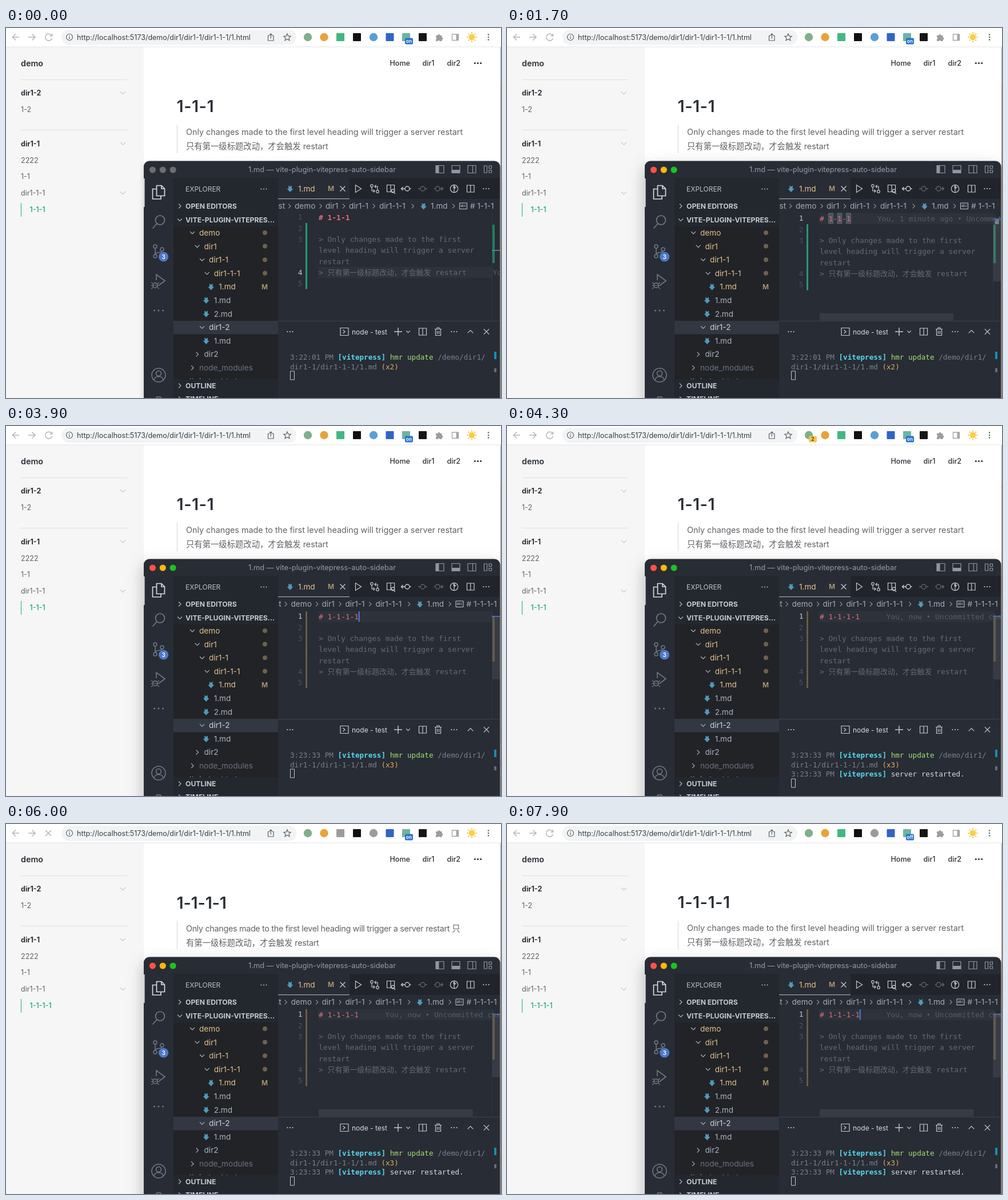
These frames come from a looping animation (866 px wide and 647 px high, 8000 ms). An HTML page:

```html
<!DOCTYPE html>
<html lang="zh-CN">
<head>
<meta charset="utf-8">
<style>
html, body { margin: 0; width: 100%; height: 100%; overflow: hidden; background: #fff; }
svg { display: block; }
text { font-family: Inter, 'Noto Sans CJK SC', 'Noto Sans CJK', sans-serif; white-space: pre; }
.mono { font-family: 'DejaVu Sans Mono', 'Noto Sans CJK SC', 'Noto Sans CJK', monospace; }
path { fill: none; }
</style>
</head>
<body>
<script>
const LOOP = 8000, END = '-8000';

// Drawing helpers; text is placed by the middle of its capitals.
const text = (x, y, s, size, fill, more = '') =>
  `<text x="${x}" y="${y + size * .36}" font-size="${size}" fill="${fill}" ${more}>${s}</text>`;
const mono = (x, y, s, size, fill, more = '') => text(x, y, s, size, fill, 'class="mono" ' + more);
const rect = (x, y, w, h, fill, more = '') =>
  `<rect x="${x}" y="${y}" width="${w}" height="${h}" fill="${fill}" ${more}/>`;
const disc = (x, y, r, fill, more = '') => `<circle cx="${x}" cy="${y}" r="${r}" fill="${fill}" ${more}/>`;
const ring = (x, y, r, col, w = 1.2) => disc(x, y, r, 'none', `stroke="${col}" stroke-width="${w}"`);
const line = (d, col, w = 1.2, more = '') => `<path d="${d}" stroke="${col}" stroke-width="${w}" ${more}/>`;
const box = (x, y, w, h) => `M${x} ${y}h${w}v${h}h${-w}z`;
const at = (x, y, body) => `<g transform="translate(${x} ${y})">${body}</g>`;
const dots = (x, y, col, gap = 4.6, r = 1.1) => [-1, 0, 1].map(i => disc(x + i * gap, y, r, col)).join('');
const chevron = (x, y, turn, col, s = 4, w = 1.2) =>
  line(`M${-s / 2} ${-s}L${s / 2} 0L${-s / 2} ${s}`, col, w, `transform="translate(${x} ${y}) rotate(${turn})"`);
const cross = (x, y, s, col, w = 1.3) =>
  line(`M${x - s} ${y - s}l${2 * s} ${2 * s}m0 ${-2 * s}l${-2 * s} ${2 * s}`, col, w);
const down = (x, y) =>
  at(x, y, '<path d="M-2.8-5.5L0-3.5L2.8-5.5V0H5.5L0 6L-5.5 0H-2.8Z" style="fill:#519aba"/>');
const badge = (x, y, s) =>
  disc(x, y, 8.6, '#4d78cc') + text(x, y, s, 10, '#fff', 'text-anchor="middle" font-weight="600"');
// Shows its body only in the given spans of the loop.
const on = (spans, body) => `<g data-on="${spans}">${body}</g>`;

const BOLD = 'font-weight="700"', SEMI = 'font-weight="600"', MED = 'font-weight="500"', MID = 'text-anchor="middle"';

function toolbar() {
  const dim = '#b4b6b9', grey = '#5f6368', tag = (x, s, fill, col) =>
    rect(x - 7, 17.5, 14, 11, fill, 'rx="2"') + text(x, 23, s, 8.5, col, MID + ' ' + SEMI);
  const square = (x, fill) => rect(x - 7, 9, 14, 14, fill, 'rx="1"');
  return rect(0, 0, 866, 33, '#fff') + rect(0, 32.5, 866, 1, '#e3e4e6') +
    rect(97, 3, 411, 26.5, '#f1f3f4', 'rx="13.2"') +
    line('M23 16H11.5M17 10.5L11.5 16L17 21.5M39 16H51M45.5 10.5L51 16L45.5 21.5', dim, 1.5) +
    on('0-5400 6800' + END, line('M79.5 12.5A6 6 0 1 0 80.5 18M80.5 10V14H76.5', dim, 1.5)) +
    on('5400-6800', cross(74, 16, 5, dim, 1.5)) +
    ring(111, 16, 5.5, grey) + line('M111 15.5v3.5M111 13v1.3', grey, 1.3) +
    text(124, 16.3, 'http://localhost:5173/demo/dir1/dir1-1/dir1-1-1/1.html', 12.5, '#3c4043') +
    line('M461 13.5h-2.5v8.5h9.5v-8.5h-2.5M463.3 18.5v-8.5m-2.5 2.5l2.5-2.5l2.5 2.5', grey) +
    line('M492 10l1.8 4.1l4.4 .4l-3.3 2.9l1 4.3l-3.9-2.3l-3.9 2.3l1-4.3l-3.3-2.9l4.4-.4z', grey) +
    disc(528, 16, 7.2, '#7fb08a') +
    on('4200-5400', tag(535, '2', '#f4c64f', '#333')) +
    disc(556.5, 16, 7.2, '#e7a33c') +
    on('0-5400 7500' + END, square(585, '#41b883')) + on('5400-7500', square(585, '#9b9b9b')) +
    square(614, '#111') +
    on('0-5400', disc(643, 16, 7.2, '#5a9fd6')) + on('5400' + END, disc(643, 16, 7.2, '#9b9b9b')) +
    square(671.5, '#2f65c7') + square(700, '#6cb5a2') +
    on('0-6600', tag(705, 'on', '#2b73c9', '#fff')) + on('6600' + END, tag(705, 'off', '#2b73c9', '#fff')) +
    square(729, '#161616') +
    '<path d="M752 13h3.5a2 2 0 1 1 4 0h3v3.5a2 2 0 1 1 0 4v2.5h-3.5a2 2 0 0 0-3.7 0H752v-3.5a2 2 0 0 0 0-3.7z" style="fill:#9a9da1"/>' +
    line(box(780.5, 11, 11, 10.5), '#a5a7aa', 1.4) + rect(787.5, 11, 4, 10.5, '#a5a7aa') +
    Array.from({ length: 8 }, (_, i) => line('M6.5 0h2', '#f2bd35', 2, `transform="translate(815 16) rotate(${i * 45})"`)).join('') +
    disc(815, 16, 5.4, '#f8cf45') +
    [-4.5, 0, 4.5].map(d => disc(844, 16 + d, 1.3, grey)).join('');
}

function page() {
  const ink = '#2b3036', soft = '#606266', green = '#1eaa7c';
  const item = (y, s, head) => text(26, y, s, 12.54, head ? ink : soft, head ? BOLD : '');
  const active = s => text(41.5, 317, s, 12.54, green, MED);
  const title = (s, gap) => text(298.5, 137, s, 28.7, ink, `${SEMI} letter-spacing="${gap}"`);
  const en = 'Only changes made to the first level heading will trigger a server restart';
  const quote = (y, s, more) => text(315, y, s, 14.34, soft, more);
  const tight = s => `<tspan letter-spacing="-.31">${s}</tspan>`;
  const full = quote(182, en) + quote(207, '只有第一级标题改动，才会触发 restart');
  return rect(0, 33, 241, 614, '#f6f6f7') +
    text(26, 61.5, 'demo', 14.34, ink, SEMI) +
    rect(26, 90, 186, 1, '#e0e0e2') + rect(26, 178, 186, 1, '#e0e0e2') +
    item(113.5, 'dir1-2', 1) + item(142.5, '1-2') + item(202, 'dir1-1', 1) +
    item(231, '2222') + item(259.5, '1-1') + item(288.5, 'dir1-1-1') +
    [113.5, 202, 288.5].map(y => chevron(204.5, y, 90, '#a9abae', 4.6, 1)).join('') +
    rect(26, 306, 1, 24, green) +
    text(671.5, 61.5, 'Home', 12.54, ink, MED) + text(728.5, 61.5, 'dir1', 12.54, ink, MED) +
    text(771.5, 61.5, 'dir2', 12.54, ink, MED) + dots(825.5, 61.5, ink, 5.2, 1.6) +
    rect(298.8, 169, 1.3, 50, '#dedee0') +
    on('0-6000', active('1-1-1') + title('1-1-1', .5) + full) +
    on('6000-6900', at(0, .5, active('1-1-1-1') + title('1-1-1-1', -.2) +
      quote(182, tight(en) + ' 只') + quote(207, '有第一级标题改动，才会触发 ' + tight('restart')))) +
    on('6900' + END, active('1-1-1-1') + title('1-1-1-1', .5) + full) +
    rect(865, 33, 1, 65, '#8fa6c4') + rect(865, 98, 1, 549, '#a58f78');
}

function frame() {
  const col = '#9197a1', lights = c => c.map((f, i) => disc(256.5 + i * 17.8, 248, 5.6, f)).join('');
  return `<rect id="shade" x="241" y="233" width="623" height="440" rx="10"/>` +
    rect(241, 232.5, 623.5, 440, '#282c34', 'rx="10"') +
    on('0-1100', lights(['#6c6e72', '#6c6e72', '#6c6e72'])) +
    on('1100' + END, lights(['#fe5148', '#fdb70c', '#1dc121'])) +
    on('2100-3700', disc(256.5, 248, 2, '#7a1410')) +
    text(553, 247.5, '1.md — vite-plugin-vitepress-auto-sidebar', 12.85, '#959ca8', MID) +
    [759, 787, 815].map(x => line(box(x - 7, 240.5, 14, 13), col)).join('') +
    rect(752, 240.5, 5.5, 13, col) + rect(780, 248, 14, 5.5, col) + line('M816.5 240.5v13', col) +
    line(box(836.5, 241, 5, 12) + box(845, 241, 4.5, 4.5) + box(845, 248.5, 4.5, 4.5), col);
}

function activity() {
  const dim = '#737984', lit = '#d7dae0';
  return rect(241, 263, 1.6, 50, lit) +
    at(267, 287, line('M-3.5-11.5H5L10.5-6V6.5H-3.5ZM5-11.5V-6H10.5M-3.5-5.5H-10.5V12H4V6.5', lit, 1.7)) +
    at(267, 339, ring(2.5, -3, 8, dim, 1.7) + line('M-3 3L-10.5 11.5', dim, 1.7)) +
    at(266, 390, ring(-5, -8, 3, dim, 1.5) + ring(-5, 9, 3, dim, 1.5) + ring(7, -3, 3, dim, 1.5) +
      line('M-5-5V6M7 0C7 4-5 1-5 6', dim, 1.5)) +
    badge(275.6, 400, 3) +
    at(266, 443, line('M-3-2V-12L12-1L2 6.5', dim, 1.6) + ring(-5, 7, 4.2, dim, 1.5) +
      line('M-9 7H-1M-12 2l3.5 2.5M2 2l-3.5 2.5M-12.5 7.5h3M2.5 7.5h-3M-12 13l3.5-2.5M2 13l-3.5-2.5', dim)) +
    dots(267, 494, dim, 7.5, 1.5) +
    ring(267, 607, 12, dim, 1.6) + ring(267, 604, 4.5, dim, 1.6) + line('M259 615.5c1-8 15-8 16 0', dim, 1.6) +
    line('M262.5 647l1.5-2h6l1.5 2', dim, 1.5) +
    on('2100-3700', badge(276, 296, 1));
}

function explorer() {
  const grey = '#abb2bf', gold = '#e2c08d', faint = '#6b717d', lit = '#d0d3d9', size = 13.6;
  const head = (y, s, turn) => chevron(304, y, turn, grey) + text(314, y, s, 12.2, '#c5c9d1', BOLD);
  // Rows: name, indent, kind (v open, > closed, f file), colour.
  const rows = [['demo', 0, 'v', gold], ['dir1', 1, 'v', gold], ['dir1-1', 2, 'v', gold], ['dir1-1-1', 3, 'v', gold],
    ['1.md', 4, 'f', gold], ['1.md', 3, 'f', grey], ['2.md', 3, 'f', grey], ['dir1-2', 2, 'v', lit],
    ['1.md', 3, 'f', grey], ['dir2', 1, '>', grey], ['node_modules', 0, '>', faint], ['index.html', 0, 'f', grey]];
  const row = ([name, depth, kind, col], i) => {
    const x = 338 + depth * 8.55, y = 358 + i * 23.62;
    return (kind == 'f' ? down(x - 13.5, y) : chevron(x - 12, y, kind == 'v' ? 90 : 0, grey)) +
      text(x, y, name, size, col) + (i < 4 ? disc(453, y, 4, '#6d614e') : '');
  };
  return rect(293, 262, 183, 385, '#23272e') + rect(293, 347, 183, 267, '#212327') +
    text(314, 281.5, 'EXPLORER', 12, '#bcc1ca') + dots(451, 281.5, grey) +
    on('0-2100 3700' + END, head(311.5, 'OPEN EDITORS', 0)) +
    on('2100-3700', head(311.5, 'OPEN EDITO...', 0) + text(443, 304, '1', 12, '#e6e8ec', MID + ' ' + MED) +
      text(443, 318, 'unsaved', 12, '#e6e8ec', MID + ' ' + MED)) +
    head(335.5, 'VITE-PLUGIN-VITEPRES...', 90) +
    rect(293, 512, 183, 23.5, '#323741') +
    `<g clip-path="url(#tree)">${rows.map(row).join('')}</g>` +
    text(447, 452.5, 'M', 12, '#b39a74', SEMI) +
    head(625.5, 'OUTLINE', 0) + head(648.5, 'TIMELINE', 0);
}

function tabs() {
  const lit = '#c5c9d1', dim = '#5d636e', gold = '#e2c08d', y = 281;
  const crumb = (x, s) => text(x, 311.5, s, 13.6, '#a4abb7');
  const crumbs = title => crumb(476.5, 'st') +
    crumb(505, 'demo') + crumb(559, 'dir1') + crumb(600, 'dir1-1') + crumb(653, 'dir1-1-1') +
    [496, 550.5, 591, 643.5, 711.5, 783].map(x => chevron(x, 311.5, 0, '#8b919c', 3.8)).join('') +
    down(730.5, 311.5) + crumb(743, '1.md') + line(box(793.5, 306, 13, 10.5), lit, 1) +
    text(800, 311, 'abc', 6, lit, MID) + crumb(812, title);
  return rect(476, 262, 388, 37, '#21252b') + rect(476, 262, 125, 37, '#282c34') + rect(476, 298, 125, 1.2, '#a2a7b0') +
    down(497, y) + text(511, y, '1.md', 13.6, gold) + text(563, y, 'M', 12, '#b39a74', SEMI) +
    on('0-2100 3700' + END, cross(589, y, 4.5, lit)) + on('2100-3700', disc(589, y, 4.6, '#e4e6ea')) +
    line('M611.5 274.5v13l10-6.5z', lit) +
    at(645, y, ring(-5, -5, 2.3, lit) + ring(5, 5, 2.3, lit) +
      line('M-5-2.5V4H0M-2.5 1.5L0 4L-2.5 6.5M5 2.5V-4H0M2.5-6.5L0-4L2.5-1.5', lit)) +
    line(box(666.5, 274.5, 13, 12) + 'M673 274.5v12M679 288l2 2', lit) + ring(677, 285, 2.8, lit) +
    ring(702, y, 4, lit, 1.4) + line('M706 281h2.5M698 281h-6m2.5-3l-3 3l3 3', lit, 1.4) +
    ring(729, y, 4, dim, 1.4) + line('M725 281h-4m12 0h4', dim, 1.4) +
    ring(755, y, 4, dim, 1.4) + line('M751 281h-2m10 0h5m-2.5-3l3 3l-3 3', dim, 1.4) +
    ring(784, y, 6.7, lit) + line('M784 275v12M784 281l3.5-2.5', lit) + disc(784, 278, 1.7, lit) +
    line(box(806.5, 275, 12.5, 12) + 'M812.7 275v12', lit) + dots(840, y, lit) +
    on('0-2800', crumbs('# 1-1-1')) + on('2800' + END, at(-6.5, 0, crumbs('# 1-1-1-1')));
}

function editor() {
  const X = 547, W = 7.78, S = 12.93, red = '#e06c75', note = '#646a76', thumb = '#363b45';
  const body = (cur, extra) => {
    const nums = [330.8, 350, 369.3, 427.5, 446.8].map((y, i) =>
      mono(518.5, y, i + 1, S, i + 1 == cur ? '#c0c5ce' : '#495162', 'text-anchor="end"')).join('');
    const words = [[369.3, '&gt; Only changes made to the first'], [388.8, 'level heading will trigger a server'],
      [408.1, 'restart'], [427.5, '&gt; 只有第一级标题改动，才会触发 restart']].map(([y, s]) => mono(X, y, s, S, note)).join('');
    return rect(546, cur == 1 ? 321.5 : 417.8, 304, 19.4, '#2d323b') + nums + words + extra;
  };
  const title = (s, more) => mono(X, 331, s, S, red, more);
  const blame = (x, y, s) => mono(x, y, s, S, '#565c67');
  const marks = [2, 4, 6].map(i =>
    rect(X + W * i, 322, W, 18, '#4a515e', 'stroke="#667080" stroke-width=".8"')).join('');
  const caret = x => rect(x, 322.5, 1.7, 18, '#528bff');
  const slider = w => rect(X, 499, w, 12.5, thumb);
  return `<g clip-path="url(#edit)">` +
    rect(850, 323, 1, 189, '#323842') +
    on('0-1100', body(4, title('# 1-1-1', BOLD) + blame(851.5, 427.5, 'You, 1 minute ago')) +
      rect(524, 341, 3, 115.5, '#259873') + rect(851, 344, 4, 67, '#227c5f') + rect(850, 388, 15, 1.6, '#5d82bd')) +
    on('1100' + END, at(0, 2, body(1, ''))) +
    on('1100-2100', rect(850, 333, 14, 110, thumb) + rect(524, 343, 3, 115.5, '#259873') +
      rect(851, 344, 4, 67, '#3b7866') + rect(850, 333, 15, 1.6, '#4d78cc') + slider(234) +
      at(0, 2, on('1400-2100', marks + rect(853.5, 333, 7, 8, '#7b828e')) + title('# 1-1-1') +
        on('1300-2100', blame(648, 331, 'You, 1 minute ago • Uncommitted changes')))) +
    on('2100' + END, rect(850, 333, 14, 110, thumb) + rect(524, 324, 3, 134.5, 'url(#hatch)') +
      rect(851, 333, 4, 79, '#645b4b') + rect(850, 332, 15, 1.6, '#4d78cc')) +
    on('2800-3700', rect(850, 332, 1.5, 18, '#4d78cc')) +
    at(0, 2, on('2100-2400', title('# 1-1-1-') + caret(609)) + on('2400' + END, title('# 1-1-1-1')) +
      on('2400-3000 3500-4000 4500-5000 5500-6000 6500-7000 7500' + END, caret(616.8)) +
      on('4200' + END, blame(663.5, 331, 'You, now • Uncommitted changes'))) +
    on('4500' + END, slider(269.5)) + '</g>';
}

function terminal() {
  const lit = '#c5c9d1', S = 12.62, y = 531, grey = '#7a808b';
  const span = (fill, s, more = '') => `<tspan fill="${fill}" ${more}>${s}</tspan>`;
  const tag = span('#56d7f0', '[vitepress]', BOLD);
  const out = (time, n) =>
    mono(497, 575.5, `${time} PM ${tag} ${span('#a5e075', 'hmr update')} /demo/dir1/`, S, grey) +
    mono(497, 592, `dir1-1/dir1-1-1/1.md ${span('#e0ad5c', `(x${n})`)}`, S, grey);
  const block = top => line(box(497.5, top, 7, 15), '#c0c5ce', 1);
  return rect(476, 512, 388, 135, '#282c34') + rect(476, 512, 388, 1, '#3b414c') +
    dots(497, y, lit) + line(box(585, 524.5, 14, 13) + 'M589.5 528l3.5 3l-3.5 3', lit) +
    text(605, y + .5, 'node - test', 12, '#d7dae0') +
    line('M679 531h14m-7-7v14', lit, 1.4) + chevron(703.5, y, 90, lit, 3.2) +
    line(box(722.5, 525, 13, 12) + 'M729 525v12', lit) +
    line('M750 526.5h12M754 526v-2h4v2M751.5 527v10.5h9v-10.5M754.5 529.5v5.5m3 0v-5.5', lit) +
    dots(784, y, lit) + chevron(812.5, y, -90, lit, 4.8) + cross(840.5, y, 4.6, lit) +
    on('0-3900', out('3:22:01', 2) + block(600)) +
    on('3900' + END, out('3:23:33', 3)) + on('3900-4200', block(600)) +
    on('4200' + END, mono(497, 608.5, `3:23:33 PM ${tag} ${span('#d7dae0', 'server restarted.')}`, S, grey) + block(617)) +
    rect(854, 566, 4, 13, '#168db0') + rect(854, 595, 4, 7, '#666c76');
}

document.body.innerHTML = `<svg width="866" height="647" viewBox="0 0 866 647">
  <defs>
    <clipPath id="tree"><rect x="293" y="347" width="183" height="267"/></clipPath>
    <clipPath id="edit"><rect x="476" y="322" width="388" height="190"/></clipPath>
    <pattern id="hatch" width="2.4" height="2.4" patternUnits="userSpaceOnUse" patternTransform="rotate(-45)">
      <rect width="2.4" height="1.2" fill="#a58b55"/></pattern>
  </defs>
  ${page()}${toolbar()}${frame()}${activity()}${tabs()}${explorer()}${editor()}${terminal()}</svg>`;

const timed = [...document.querySelectorAll('[data-on]')].map(el =>
  ({ el, spans: el.dataset.on.split(' ').map(s => s.split('-').map(Number)) }));
const shade = document.getElementById('shade');

function draw(now) {
  const t = now % LOOP;
  for (const { el, spans } of timed)
    el.style.display = spans.some(([a, b]) => t >= a && t < b) ? '' : 'none';
  // The window's shadow widens as it gains focus.
  const k = Math.min(1, Math.max(0, (t - 1100) / 500));
  shade.style.filter = `drop-shadow(0 ${3 + 7 * k}px ${5 + 9 * k}px rgba(0,0,0,${.18 + .08 * k}))`;
  requestAnimationFrame(draw);
}
draw(performance.now());
</script>
</body>
</html>
```
